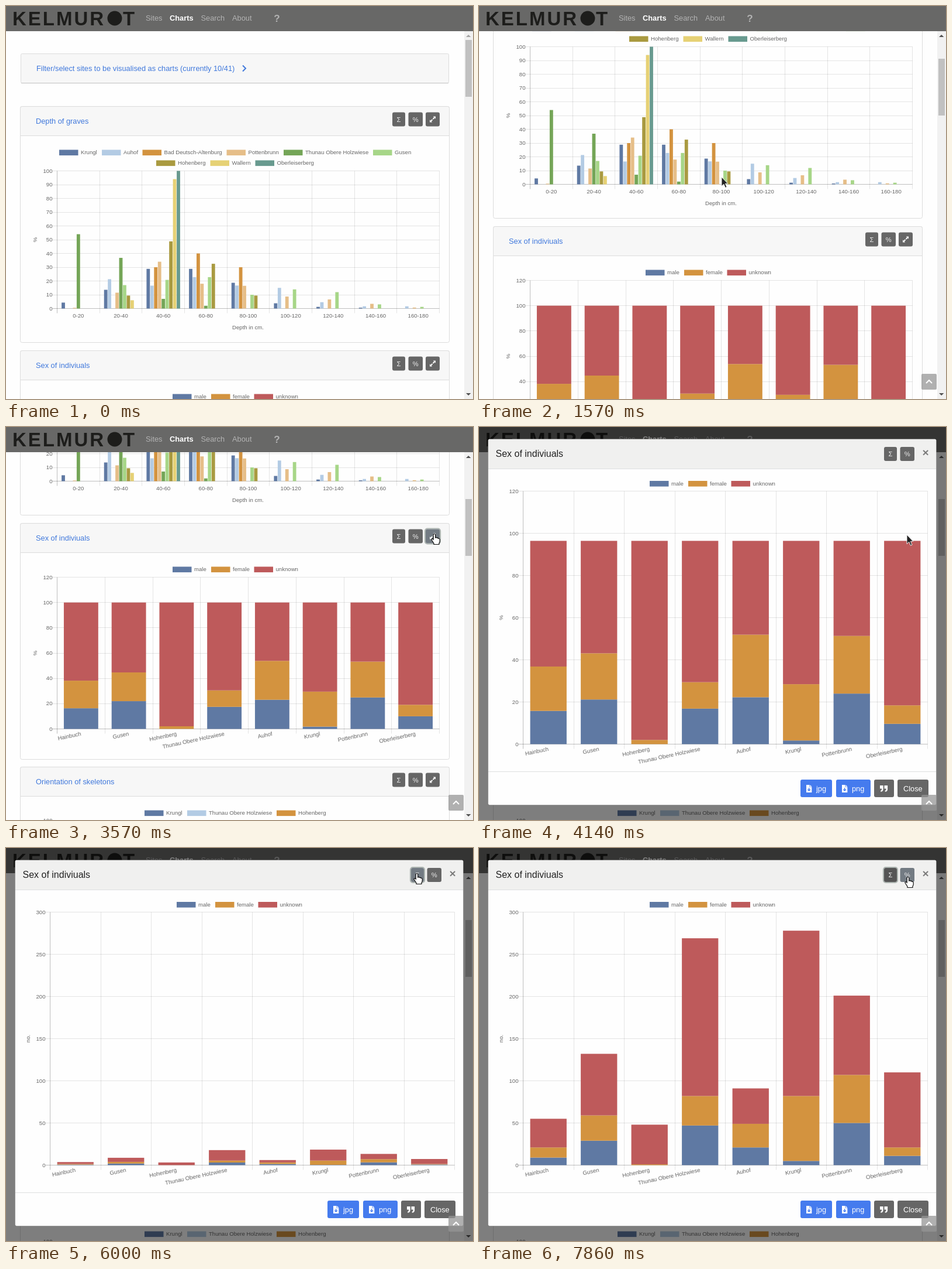
Recreate the animation shown at these times as an HTML page. Size 799 by 671 pixels, loop 8 s.

```html
<!DOCTYPE html>
<html lang="en">
<head>
<meta charset="utf-8">
<title>Charts</title>
<style>
html, body { margin: 0; width: 100%; height: 100%; overflow: hidden; background: #fefefe; }
svg { display: block; width: 799px; height: 671px; font-family: "Liberation Sans", Arial, sans-serif; }
text { white-space: pre; }
.lab { font-size: 9.6px; fill: #666; }
.link { font-size: 12.8px; fill: #4179dc; }
.nav { font-size: 12.8px; fill: #b3b3b3; }
.btn { font-size: 11.2px; fill: #eee; text-anchor: middle; }
.foot { font-size: 12.8px; fill: #fff; }
.mid { text-anchor: middle; }
.end { text-anchor: end; }
.grid { stroke: #000; stroke-opacity: .1; fill: none; }
.zero { stroke: #000; stroke-opacity: .25; fill: none; }
.card { fill: #fefefe; stroke: #dcdcdc; }
.head { fill: #f7f7f7; stroke: #dcdcdc; }
.key { fill: #666; }
.ring { fill: none; stroke: #adb5b1; stroke-width: 2.2; visibility: hidden; }
.focus .ring { visibility: visible; }
.focus .key { fill: #555; }
.hover .key { fill: #737b83; }
</style>
</head>
<body>
<svg id="stage" viewBox="0 0 799 671"></svg>
<script>
const BLUE = '#5f79a3', SKY = '#b3cbe4', ORANGE = '#d3933f', SAND = '#e6be88', GREEN = '#74a557',
  LIME = '#a7d688', OLIVE = '#a99a40', YELLOW = '#e6d175', TEAL = '#689a8f', RED = '#be5a5b';
const DEPTH_COLORS = [BLUE, SKY, ORANGE, SAND, GREEN, LIME, OLIVE, YELLOW, TEAL];

// percent per site, one row for each depth class
const DEPTH = [
  [4.3, 0, 0, .5, 54],
  [13.6, 21.3, 0, 11.5, 36.8, 17, 9.4, 6],
  [28.8, 16.6, 30, 34, 7, 20.8, 48.8, 94, 100],
  [28.8, 22.8, 40, 18, 2, 22.8, 32.5],
  [18.7, 16.7, 30, 16.5, 0, 10, 9.4],
  [3.8, 15, 0, 8.7, 0, 13.9],
  [1.2, 4.6, 0, 6.6, 0, 11.9],
  [.6, 1.6, 0, 3.4, 0, 3],
  [0, 1.6, 0, .7, 0, 1.2]
];

// male, female, unknown
const SEX = {
  'Hainbuch': [9, 12, 34], 'Gusen': [29, 30, 73], 'Hohenberg': [0, 1, 47],
  'Thunau Obere Holzwiese': [47, 35, 187], 'Auhof': [21, 28, 42], 'Krungl': [5, 77, 196],
  'Pottenbrunn': [50, 57, 94], 'Oberleiserberg': [11, 10, 89]
};
const SITES = Object.keys(SEX);

const text = (x, y, s, cls, more = '') => `<text x="${x}" y="${y}" class="${cls}" ${more}>${s}</text>`;
const rect = (x, y, w, h, fill, more = '') =>
  `<rect x="${x}" y="${y}" width="${w}" height="${h}" fill="${fill}" ${more}/>`;
const path = (d, more) => `<path d="${d}" ${more}/>`;
const crisp = v => Math.floor(v) + .5;

function axes(a, unit) {
  let grid = '', out = '';
  for (let v = a.step; v <= a.max; v += a.step)
    grid += `M${a.l - 8} ${crisp(a.b - (a.b - a.t) * v / a.max)}H${a.r}`;
  for (let i = 1; i <= a.n; i++)
    grid += `M${crisp(a.l + (a.r - a.l) * i / a.n)} ${a.t}V${a.b + 8}`;
  for (let v = 0; v <= a.max; v += a.step)
    out += text(a.l - 8, a.b - (a.b - a.t) * v / a.max + 3, v, 'lab end');
  const y = (a.t + a.b) / 2;
  return path(grid, 'class="grid"') + path(`M${a.l} ${a.t}V${a.b + 8}M${a.l - 8} ${a.b}H${a.r}`, 'class="zero"') + out +
    text(0, 0, unit, 'lab mid', `transform="translate(${a.l - 34.5} ${y}) rotate(-90)"`);
}

const legend = (y, items) => items.map(([x, name, color]) =>
  rect(x, y - 4.5, 32.5, 9.6, color) + text(x + 37, y + 3, name, 'lab')).join('');

const sexLegend = (x, y) =>
  legend(y, [[x, 'male', BLUE], [x + 66, 'female', ORANGE], [x + 139.5, 'unknown', RED]]);

// bars stand on y = 0
function stacks(a, percent) {
  const w = (a.r - a.l) / a.n;
  return SITES.map((s, i) => {
    const sum = SEX[s].reduce((p, q) => p + q);
    let y = 0;
    return SEX[s].map((v, k) => {
      const h = (percent ? v / sum * 100 : v) / a.max * (a.b - a.t);
      y -= h;
      return rect(a.l + w * (i + .14), y, w * .72, h, [BLUE, ORANGE, RED][k]);
    }).join('');
  }).join('');
}

const siteLabels = a => SITES.map((s, i) => text(0, 3.2, s, 'lab end',
  `transform="translate(${a.l + (a.r - a.l) * (i + .5) / a.n} ${a.b + 8}) rotate(-12)"`)).join('');

function button(x, y, w, face, id = '') {
  return `<g ${id && `id="${id}"`}><rect class="ring" x="${x - 1}" y="${y - 1}" width="${w + 2}" height="26" rx="4"/>` +
    `<rect class="key" x="${x}" y="${y}" width="${w}" height="24" rx="3"/>${face}</g>`;
}
const keys = (x, y, id) =>
  button(x, y, 22, text(x + 11, y + 16, 'Σ', 'btn'), id && id + 'Sum') +
  button(x + 27.5, y, 24.5, text(x + 39.7, y + 16, '%', 'btn'), id && id + 'Pct');

function expand(x, y, id) {
  const d = 'M5 -5V-.8L3.6 -2.2 1.2 .2 -.2 -1.2 2.2 -3.6 .8 -5Z';
  const icon = `<g transform="translate(${x + 12} ${y + 12})" fill="#fff">${path(d, '')}${path(d, 'transform="rotate(180)"')}</g>`;
  return button(x, y, 24, icon, id);
}

function card(y, h, title, id) {
  return `<rect class="card" x="24.5" y="${y}" width="734" height="${h}" rx="3"/>` +
    path(`M24.5 ${y + 50}V${y + 3}q0 -3 3 -3h728q3 0 3 3v47z`, 'class="head"') +
    text(51, y + 29.5, title, 'link') + keys(661, y + 10, '') + expand(718, y + 10, id);
}

function depthChart() {
  const a = { l: 87.5, r: 741.5, t: 281.5, b: 516.5, max: 100, step: 10, n: 9 };
  const w = (a.r - a.l) / 9, bw = w * .8 / 9;
  let out = axes(a, '%');
  DEPTH.forEach((row, i) => {
    row.forEach((v, k) => {
      const h = v * 2.35;
      out += rect(a.l + w * (i + .1) + bw * (k + .05), a.b - h, bw * .9, h, DEPTH_COLORS[k]);
    });
    out += text(a.l + w * (i + .5), 532, `${i * 20}-${i * 20 + 20}`, 'lab mid');
  });
  const names = ['Krungl', 'Auhof', 'Bad Deutsch-Altenburg', 'Pottenbrunn', 'Thunau Obere Holzwiese',
    'Gusen', 'Hohenberg', 'Wallern', 'Oberleiserberg'];
  const xs = [91, 164, 233.5, 377.5, 475, 628, 257, 349.5, 426.5];
  const item = i => [xs[i], names[i], DEPTH_COLORS[i]];
  return out + text(414, 552, 'Depth in cm.', 'lab mid') +
    legend(250, [0, 1, 2, 3, 4, 5].map(item)) + legend(268, [6, 7, 8].map(item));
}

function sexChart() {
  const a = { l: 87.5, r: 741.5, t: 680.5, b: 939.5, max: 120, step: 20, n: 8 };
  return sexLegend(285, 667) + axes(a, '%') + siteLabels(a) +
    `<g transform="translate(0 ${a.b})">${stacks(a, true)}</g>`;
}

const page = `<g id="page">
  <rect class="head" x="25.5" y="81.5" width="732" height="50" rx="2"/>
  ${path('M26 131.7H757', 'stroke="#c4c4c4"')}
  ${text(52, 111, 'Filter/select sites to be visualised as charts (currently 10/41)', 'link')}
  ${path('M405 101.5l5 5 -5 5', 'fill="none" stroke="#4179dc" stroke-width="2"')}
  ${card(171.5, 403, 'Depth of graves')}${depthChart()}
  ${card(588.5, 403, 'Sex of indiviuals', 'open')}${sexChart()}
  ${card(1004.5, 403, 'Orientation of skeletons')}
  ${legend(1083, [[237, 'Krungl', BLUE], [310, 'Thunau Obere Holzwiese', SKY], [463, 'Hohenberg', ORANGE]])}
  ${text(79.5, 1099, '100', 'lab end')}
</g>`;

const nav = rect(0, 0, 799, 43, '#686867') +
  text(11, 33, 'KELMUR', '', 'font-size="33" font-weight="700" letter-spacing="3" fill="#1d1d1b"') +
  '<circle cx="186" cy="21" r="12.5" fill="#1d1d1b"/>' +
  text(200, 33, 'T', '', 'font-size="33" font-weight="700" fill="#1d1d1b"') +
  text(239, 25, 'Sites', 'nav') + text(280, 25, 'Charts', 'nav', 'style="fill:#fff;font-weight:700"') +
  text(333.5, 25, 'Search', 'nav') + text(387, 25, 'About', 'nav') +
  text(463.5, 26.5, '?', 'nav mid', 'style="font-size:17px;font-weight:700"');

const scrollbar = rect(784, 43, 15, 628, '#f1f1f1') + rect(786, 58, 11, 97, '#c1c1c1', 'id="thumb"') +
  path('M787 53l4.2 -4 4.2 4z', 'id="up"') + path('M787 661l4.2 4 4.2 -4z', 'fill="#505050"');

const PCT = { l: 75.5, r: 767.5, t: 109.5, b: 541.5, max: 120, step: 20, n: 8 };
const NUM = { ...PCT, max: 300, step: 50 };
const view = (id, a, unit) => `<g id="${id}">${axes(a, unit)}<g id="${id}Bars">${stacks(a, id === 'pct')}</g></g>`;
const footKey = (x, w, fill, face) => rect(x, 602, w, 30, fill, 'rx="3"') + face;
const fileIcon = x => path(`M${x} 611h5.5v3.6h3.8V624h-9.3z`, 'fill="#fff"') + path(`M${x + 6.4} 611l2.9 2.9h-2.9z`, 'fill="#fff"') +
  path(`M${x + 4.6} 616v5m-2.3 -2.2l2.3 2.3 2.3 -2.3`, 'fill="none" stroke="#457bee" stroke-width="1.4"');
const quote = x => path(`M${x} 612h5.6v6.5q0 4 -4.4 4.3v-2q2 -.2 2 -3.2h-3.2z`, 'fill="#fff"');

const modal = `<g id="modal">
  ${rect(15.5, 20.5, 767, 625, '#fefefe', 'rx="3" stroke="#000" stroke-opacity=".2"')}
  ${path('M16 71V24q0 -3 3 -3h760q3 0 3 3v47z', 'fill="#f0f0ef"')}
  ${path('M16 71.5H782M16 588.5H782', 'stroke="#dedfe0"')}
  ${text(28.5, 51, 'Sex of indiviuals', '', 'font-size="16" fill="#222"')}
  ${keys(693, 34, 'm')}
  ${text(764, 49.5, '×', 'mid', 'font-size="19.2" font-weight="700" fill="#7b7b7b"')}
  ${sexLegend(292, 96.5)}${view('pct', PCT, '%')}${view('num', NUM, 'no.')}${siteLabels(PCT)}
  ${footKey(550, 54, '#457bee', fileIcon(560) + text(577, 622, 'jpg', 'foot'))}
  ${footKey(611, 59, '#457bee', fileIcon(621) + text(638, 622, 'png', 'foot'))}
  ${footKey(676, 34, '#666', quote(686) + quote(693.5))}
  ${footKey(716, 53, '#666', text(726, 622, 'Close', 'foot'))}
</g>`;

const toTop = `<g id="top">${rect(757, 628, 26, 27, '#969696', 'rx="2" fill-opacity=".75"')}
  ${path('M765 644l5 -5 5 5', 'fill="none" stroke="#fff" stroke-width="2"')}</g>`;

const cursor = `<g id="cursor">
  ${path('M0 0V15.6L3.8 12.2 6.4 18.3 9 17.2 6.4 11.3H10.8Z', 'id="arrow" fill="#222" stroke="#fff" stroke-width=".9"')}
  ${path('M-1.8 9V1.2a1.7 1.7 0 0 1 3.4 0V6l1 -.4q1.6 -.3 2.1 1 1.6 -.5 2.3 .9 1.9 -.4 2.2 1.4V12q0 2 -1.3 3.3V17.5H-1V15.6L-4.8 9.8q-.8 -1.6 .8 -2 1 0 2.2 1.2Z',
    'id="hand" fill="#fff" stroke="#111" stroke-width="1.2"')}
</g>`;

document.getElementById('stage').innerHTML = rect(0, 0, 799, 671, '#fefefe') + page + nav + scrollbar +
  rect(0, 0, 799, 671, '#000', 'id="dim"') + modal + toTop + cursor;

const $ = id => document.getElementById(id);
const clamp = v => Math.min(1, Math.max(0, v));
const quart = u => 1 - (1 - clamp(u)) ** 4;
const show = (id, on) => $(id).style.display = on ? '' : 'none';
const set = (id, name, value) => $(id).setAttribute(name, value);

const SCROLL = [[860, 0], [1000, 44], [1143, 104], [1286, 152], [1429, 190], [1571, 212], [1714, 212], [2000, 424]];
const POINTER = [[429, 406, 247], [714, 417, 291], [1000, 417, 291], [1571, 415, 292], [2290, 415, 292], [3286, 733, 183],
  [3600, 733, 183], [3714, 732, 184], [4571, 732, 184], [5286, 703, 44], [6714, 703, 44], [7143, 733, 52], [7290, 733, 52], [7429, 734, 50]];

// value of a keyframe track at time t
function at(track, t, ease = u => u) {
  const i = track.findIndex(k => k[0] > t);
  if (i < 0) return track[track.length - 1].slice(1);
  if (i === 0) return track[0].slice(1);
  const p = track[i - 1], q = track[i], u = ease((t - p[0]) / (q[0] - p[0]));
  return p.slice(1).map((v, k) => v + (q[k + 1] - v) * u);
}

function state(id, hover, focus) {
  set(id, 'class', (focus ? 'focus ' : '') + (hover ? 'hover' : ''));
}

function draw(t) {
  const scroll = Math.round(at(SCROLL, t)[0]);
  set('page', 'transform', `translate(0 ${-scroll})`);
  set('thumb', 'y', 58 + Math.round(scroll * .153));
  set('up', 'fill', scroll ? '#505050' : '#a3a3a3');
  set('top', 'opacity', clamp((t - 1100) / 400));

  const [x, y] = at(POINTER, t, u => u * u * (3 - 2 * u));
  const hand = t >= 3280 && t < 3700 || t >= 5280;
  show('cursor', t >= 428);
  show('arrow', !hand);
  show('hand', hand);
  set('cursor', 'transform', `translate(${x} ${y})`);

  state('open', t >= 3280 && t < 3700, t >= 3570);
  state('mSum', t >= 5280 && t < 6990, t >= 5850);
  state('mPct', t >= 7130, false);

  set('dim', 'opacity', .5 * clamp((t - 3572) / 150));
  set('modal', 'opacity', clamp((t - 3690) / 150));
  set('modal', 'transform', `translate(0 ${-50 * (1 - clamp((t - 3690) / 300)) ** 2})`);

  const counts = t >= 5983;
  show('pct', !counts);
  show('num', counts);
  set('pctBars', 'transform', `translate(0 541.5) scale(1 ${quart((t - 3578) / 1000)})`);
  set('numBars', 'transform', `translate(0 541.5) scale(1 ${quart((t - 5983) / 1000)})`);
}

const start = performance.now();
function tick(now) {
  const t = Math.max(0, now - start) % 8000;
  draw(Math.floor((t + 5) * 7 / 1000) % 56 * 1000 / 7);
  requestAnimationFrame(tick);
}
draw(0);
requestAnimationFrame(tick);
</script>
</body>
</html>
```
